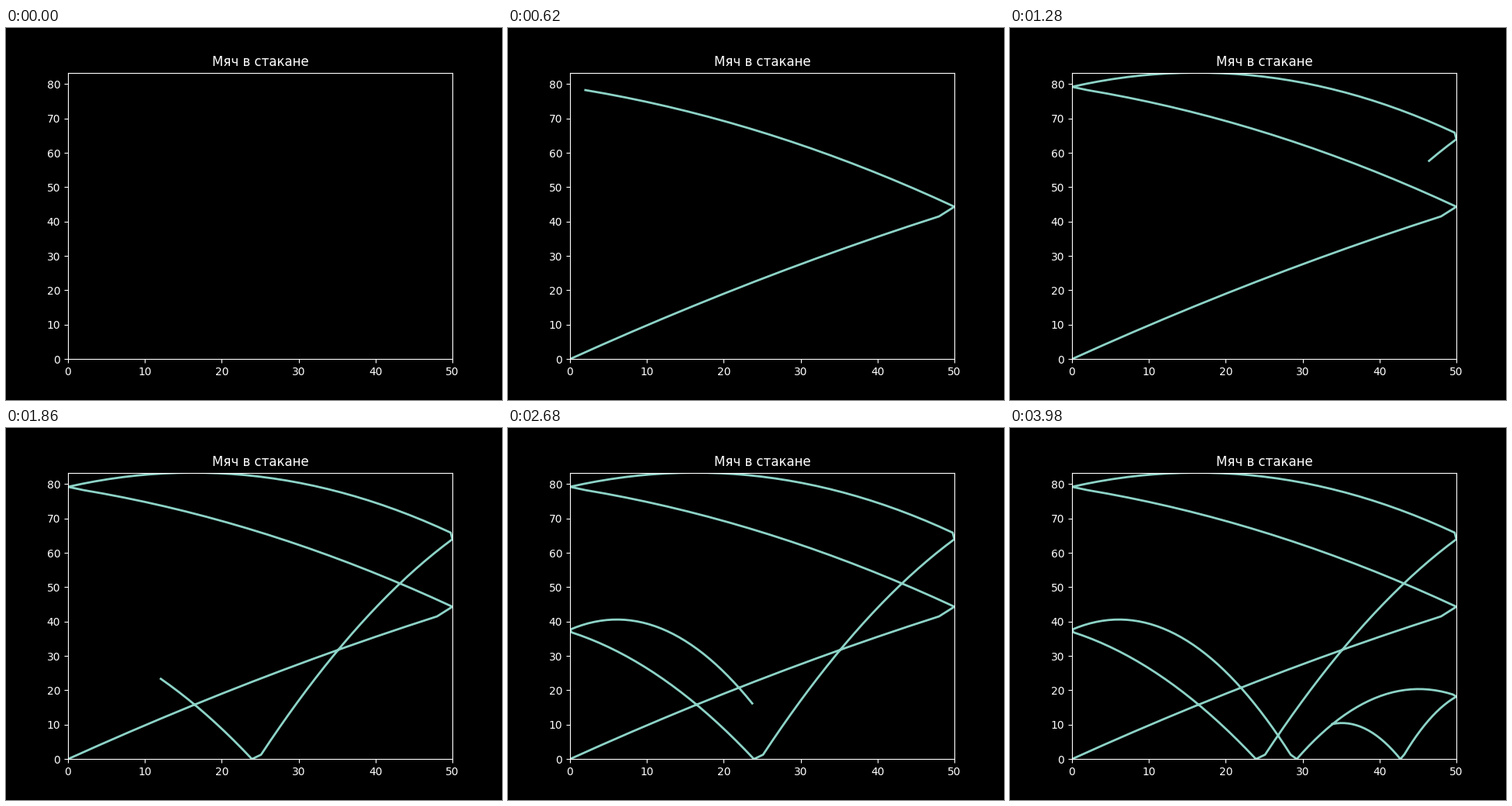
These frames come from a looping animation (640 by 480 pixels, 4000 ms). A matplotlib script:

```python
import matplotlib.pyplot as plt
from matplotlib.animation import FuncAnimation

WIDTH = 50      # inner width of the glass
G = 9.838
DT = 0.1
LOSS = 1.5      # speed divisor at each bounce
SLIP = 0.988    # floor friction when rolling to the right
FRAMES = 200


def fly(x, y, vx, vy, steps):
    """Euler steps of a ball bouncing off two walls and the floor."""
    path = [(x, y)]
    for _ in range(steps):
        x += vx * DT
        y += vy * DT
        vy -= G * DT
        if not 0 <= x <= WIDTH:
            x = min(max(x, 0), WIDTH)
            vx = -vx / LOSS
        if y < 0:
            y = 0
            vy = -vy / LOSS
            if vx > 0:
                vx *= SLIP
        path.append((x, y))
    return zip(*path)


xs, ys = fly(0, 0, 40, 40, FRAMES - 1)

plt.style.use("dark_background")
fig, ax = plt.subplots(figsize=(6.4, 4.8), dpi=100)
ax.set_title("Мяч в стакане")
ax.set_xlim(0, WIDTH)
ax.set_ylim(0, max(ys))
line, = ax.plot([], [], lw=2)


def init():
    line.set_data([], [])
    return line,


def update(i):
    # a lone start point leaves no trace
    n = i + 1 if i else 0
    line.set_data(xs[:n], ys[:n])
    return line,


anim = FuncAnimation(fig, update, frames=FRAMES, init_func=init,
                     interval=20, repeat=True, repeat_delay=0)
plt.show()
```
